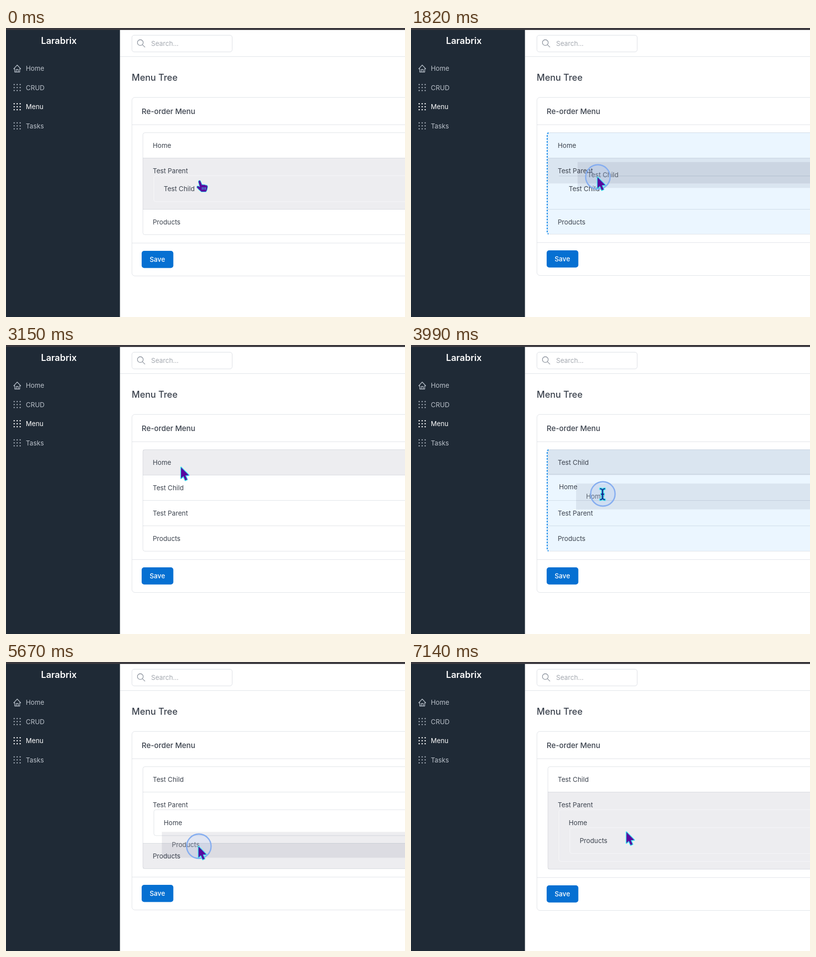
Recreate the animation shown at these times as an HTML page. Size 800 by 581 pixels, loop 7210 ms.

```html
<!DOCTYPE html>
<html lang="en">
<head>
<meta charset="utf-8">
<title>Menu Tree</title>
<style>
  html, body { margin: 0; width: 100%; height: 100%; overflow: hidden; background: #fff; }
  svg { display: block; width: 800px; height: 581px; }
  text { font: 400 13.2px Inter, "Noto Sans", sans-serif; fill: #3b424d; white-space: pre; }
  .line { fill: none; stroke: rgba(30, 50, 80, .13); }
  .hover { fill: rgba(10, 10, 45, .07); }
  .blue { fill: rgba(0, 144, 255, .08); }
  .nav text { fill: #bac1ca; }
  .nav { fill: #a6afba; }
  .nav.on, .nav.on text { fill: #fff; }
  .cursor > * { stroke: #3fe4ee; stroke-width: 3; stroke-linejoin: round; paint-order: stroke; fill: #5708a0; }
</style>
</head>
<body>
<svg viewBox="0 0 800 581">
  <rect width="800" height="581" fill="#fff"/>
  <rect y="4" width="228.5" height="577" fill="#1f2a36"/>
  <rect width="800" height="4" fill="#3a383d"/>
  <text x="106" y="32.4" text-anchor="middle" style="font-size:18px;font-weight:600;fill:#fff">Larabrix</text>
  <g id="nav"></g>

  <path class="line" d="M228.5 57.5H800"/>
  <rect x="252.5" y="14.5" width="201" height="33.5" rx="4.5" fill="#fff" stroke="#dce0e5"/>
  <g fill="none" stroke="#8d949e" stroke-width="1.3" stroke-linecap="round">
    <circle cx="269.3" cy="29.3" r="5.8"/><path d="M273.6 33.6L278.4 38.4"/>
  </g>
  <text x="291" y="36" style="fill:#a4a9b0">Search...</text>
  <text x="252" y="105.5" style="font-size:18px;font-weight:500">Menu Tree</text>
  <text x="272" y="172.6" style="font-size:14.9px;font-weight:500">Re-order Menu</text>

  <rect id="card" class="line" x="252.5" y="139.5" width="600" rx="6"/>
  <path class="line" d="M253 194.5H800"/>
  <g id="footer">
    <path class="line" d="M253 432.3H800"/>
    <rect x="272" y="448" width="63.5" height="34.5" rx="5" fill="#0670d2"/>
    <text x="288" y="470.2" style="fill:#fff;font-weight:500">Save</text>
  </g>

  <rect id="rootBlue" class="blue" x="274" y="210" width="600" rx="4"/>
  <rect id="rootBox" class="line" x="274.5" y="210.5" width="600" rx="4"/>
  <path id="rootDash" fill="none" stroke="#168ef0" stroke-width="2" stroke-dasharray="3.5 2.5"/>
  <g id="items"></g>
  <g id="ghost"><rect class="hover" width="600" height="52"/><text x="20" y="30.5" opacity=".8"></text></g>

  <circle id="ring" fill="rgba(110,160,250,.1)" stroke="#86aef0"/>
  <g id="pointer" class="cursor">
    <path id="arrow" d="M0 0V22L4.8 17.6L8.4 26L12.2 24.4L8.6 16.2L15.4 15.8Z"/>
    <g id="hand" style="stroke-width:2">
      <path d="M-2 2Q-1 -1.5 1.5 .5L5 9Q7 7 8.5 9Q10.500 7.500 12 9.500Q15.500 8.500 16 12L15 17Q14.500 20 12.500 22H4Q-1 18 -5 13.500Q-5.500 10 -1.500 11.500L1 13Z"/>
      <path d="M5.500 13V18M8.700 13V18M11.800 13V18" style="stroke-width:1.1"/>
    </g>
    <path id="beam" d="M-5 -12Q-1 -12 0 -9.500Q1 -12 5 -12V-10Q1.200 -10 1.200 -7V-1.200H3V1.200H1.200V7Q1.200 10 5 10V12Q1 12 0 9.500Q-1 12 -5 12V10Q-1.200 10 -1.200 7V1.200H-3V-1.200H-1.200V-7Q-1.200 -10 -5 -10Z" style="fill:#17238f"/>
  </g>
</svg>
<script>
const LOOP = 7210, TICK = 70, SLIDE = 150;
const $ = id => document.getElementById(id);
const set = (el, attrs) => { for (const k in attrs) el.setAttribute(k, attrs[k]); };
const clamp = v => Math.max(0, Math.min(1, v));
const at = (el, x, y) => set(el, { transform: `translate(${x} ${y})` });
const show = (el, on) => el.style.display = on ? '' : 'none';

// A row is a name, or [name, child].
const stages = [
  [0, ['Home', ['Test Parent', 'Test Child'], 'Products']],
  [1820, ['Home', 'Test Child', 'Test Parent', 'Products']],
  [3700, [['Test Child', 'Home'], 'Test Parent', 'Products']],
  [3890, ['Test Child', 'Home', 'Test Parent', 'Products']],
  [4340, ['Test Child', ['Test Parent', 'Home'], 'Products']],
  [5880, ['Test Child', ['Test Parent', ['Home', 'Products']]]]
].map(([time, rows]) => ({ time, ...layout(rows) }));

const hovers = [[0, 'Test Parent'], [2660, 'Test Child'], [2870, 'Home'], [3700, 'Test Child'],
  [4970, 'Test Parent'], [5110, 'Products'], [6580, 'Test Parent']];
const pointers = [[0, 'hand'], [1080, 'arrow'], [3860, 'beam'], [4700, 'arrow']];
const drags = [
  { name: 'Test Child', from: 1085, to: 2480, x: 336.5, y: 328 },
  { name: 'Home', from: 3330, to: 4950, x: 327.5, y: 232 },
  { name: 'Products', from: 5440, to: 6480, x: 348, y: 394 }
];
const drops = [[1820, 2560, 'root'], [3700, 3890, 'Test Child'], [3890, 4340, 'root'],
  [4340, 4990, 'Test Parent'], [5880, 6520, 'Home']];
const path = [[0, 388, 307], [70, 388, 307], [140, 382, 310], [280, 382, 310], [1050, 336.5, 328],
  [1120, 338, 328], [1260, 351.5, 327], [1820, 374, 300], [2310, 388, 277], [2520, 388, 277],
  [3150, 351, 246], [3360, 327.5, 232], [3500, 332, 240], [3990, 384, 300], [4340, 392, 318],
  [4760, 402, 330], [4970, 402, 330], [5250, 348, 394], [5460, 348, 394], [5670, 386, 371],
  [6160, 408, 360], [6480, 412, 357], [7000, 412, 357], [7140, 432, 342]];

function layout(rows) {
  const place = {};
  const put = (row, x, y, root) => {
    const [name, child] = Array.isArray(row) ? row : [row];
    const h = 51 + (child ? put(child, x + 22, y + 36) + 1 : 0);
    place[name] = { x, y, h, child: !!child, root };
    return h;
  };
  let y = 210.5;
  for (const row of rows) y += put(row, 274.5, y, true);
  return { place, total: y - 210.5 };
}

const last = (table, t) => table.filter(row => row[0] <= t).pop();

function cursorAt(t) {
  const i = path.findIndex(p => p[0] > t);
  if (i < 0) return path[path.length - 1].slice(1);
  const [a, b] = [path[i - 1], path[i]];
  const k = (t - a[0]) / (b[0] - a[0]);
  return [a[1] + (b[1] - a[1]) * k, a[2] + (b[2] - a[2]) * k];
}

function blueAt(name, t) {
  return Math.max(0, ...drops.filter(d => d[2] === name && t >= d[0])
    .map(d => t < d[1] ? 1 : drops.some(e => e[0] === d[1]) ? 0 : clamp(1 - (t - d[1]) / 140)));
}

['Home', 'CRUD', 'Menu', 'Tasks'].forEach((label, i) => {
  const y = 81.3 + 38.5 * i;
  let icon = '<path fill="none" stroke="#b5bdc7" stroke-width="1.3" stroke-linejoin="round" d="M17.500 82H15.500L22.500 74.500L29.500 82H27.500V88.500H17.500ZM20.500 88V83.500H24.500V88"/>';
  if (i) {
    icon = '';
    for (let n = 0; n < 9; n++)
      icon += `<circle cx="${16.4 + n % 3 * 6}" cy="${y - 6 + (n / 3 | 0) * 6}" r="1.25"/>`;
  }
  $('nav').innerHTML += `<g class="nav${label === 'Menu' ? ' on' : ''}">${icon}<text x="39.800" y="${y + 4.8}">${label}</text></g>`;
});

const items = ['Test Parent', 'Test Child', 'Home', 'Products'].map(name => {
  const el = document.createElementNS('http://www.w3.org/2000/svg', 'g');
  el.innerHTML = `<rect class="hover" width="600"/><path class="line" d="M0 0H600"/>
    <rect class="blue" x="22" y="35.500" width="600" rx="4"/>
    <rect class="line" x="22" y="35.500" width="600" rx="4"/>
    <text x="19.700" y="30.500">${name}</text>`;
  $('items').append(el);
  const [hover, line, blue, box] = el.children;
  return { name, el, hover, line, blue, box };
});

function drawItems(t) {
  const i = stages.filter(s => s.time <= t).length - 1;
  const now = stages[i], before = stages[Math.max(0, i - 1)];
  const left = (1 - clamp((t - now.time) / SLIDE)) ** 2;
  const hovered = last(hovers, t)[1];
  for (const { name, el, hover, line, blue, box } of items) {
    const p = now.place[name], q = before.place[name];
    at(el, p.x + (q.x - p.x) * left, p.y + (q.y - p.y) * left);
    show(hover, name === hovered);
    set(hover, { height: p.h });
    show(line, p.root && p.y > 211);
    show(blue, p.child);
    show(box, p.child);
    const inner = Math.max(0, p.h - 51);
    set(blue, { height: inner, opacity: blueAt(name, t) });
    set(box, { height: inner });
    const holder = now.place[hovered];
    const shaded = p.y >= holder.y && p.y < holder.y + holder.h;
    box.style.stroke = shaded ? '#f7f7f9' : '';
  }
  const shift = now.total - 205;
  at($('footer'), 0, shift);
  set($('card'), { height: 359 + shift });
  set($('rootBox'), { height: now.total });
  set($('rootBlue'), { height: now.total, opacity: blueAt('root', t) });
  set($('rootDash'), { d: `M276 211Q273 211 273 214V${207 + now.total}Q273 ${210 + now.total} 276 ${210 + now.total}` });
}

function drawPointer(t) {
  const [x, y] = cursorAt(t);
  at($('pointer'), x, y);
  const kind = last(pointers, t)[1];
  for (const id of ['arrow', 'hand', 'beam']) show($(id), id === kind);

  const drag = drags.find(d => t >= d.from && t < d.to + 200);
  const held = drag && t < drag.to;
  show($('ring'), drag);
  show($('ghost'), held);
  show($('rootDash'), held && blueAt('root', t) === 1);
  if (!drag) return;
  const out = clamp((t - drag.to) / 200);
  const grow = clamp((t - drag.from) / 100);
  set($('ring'), { cx: x + .7, cy: y - .6, r: 15 + 9.5 * grow + 13 * out, 'stroke-width': 2.6 - 3 * Math.min(.5, out), opacity: 1 - out * out });
  if (!held) return;
  const home = stages.filter(s => s.time <= drag.from).pop().place[drag.name];
  at($('ghost'), home.x + x - drag.x, home.y + y - drag.y);
  $('ghost').lastChild.textContent = drag.name;
}

const start = performance.now();
function frame() {
  const t = Math.floor((performance.now() - start) % LOOP / TICK) * TICK;
  drawItems(t);
  drawPointer(t);
  requestAnimationFrame(frame);
}
frame();
</script>
</body>
</html>
```
